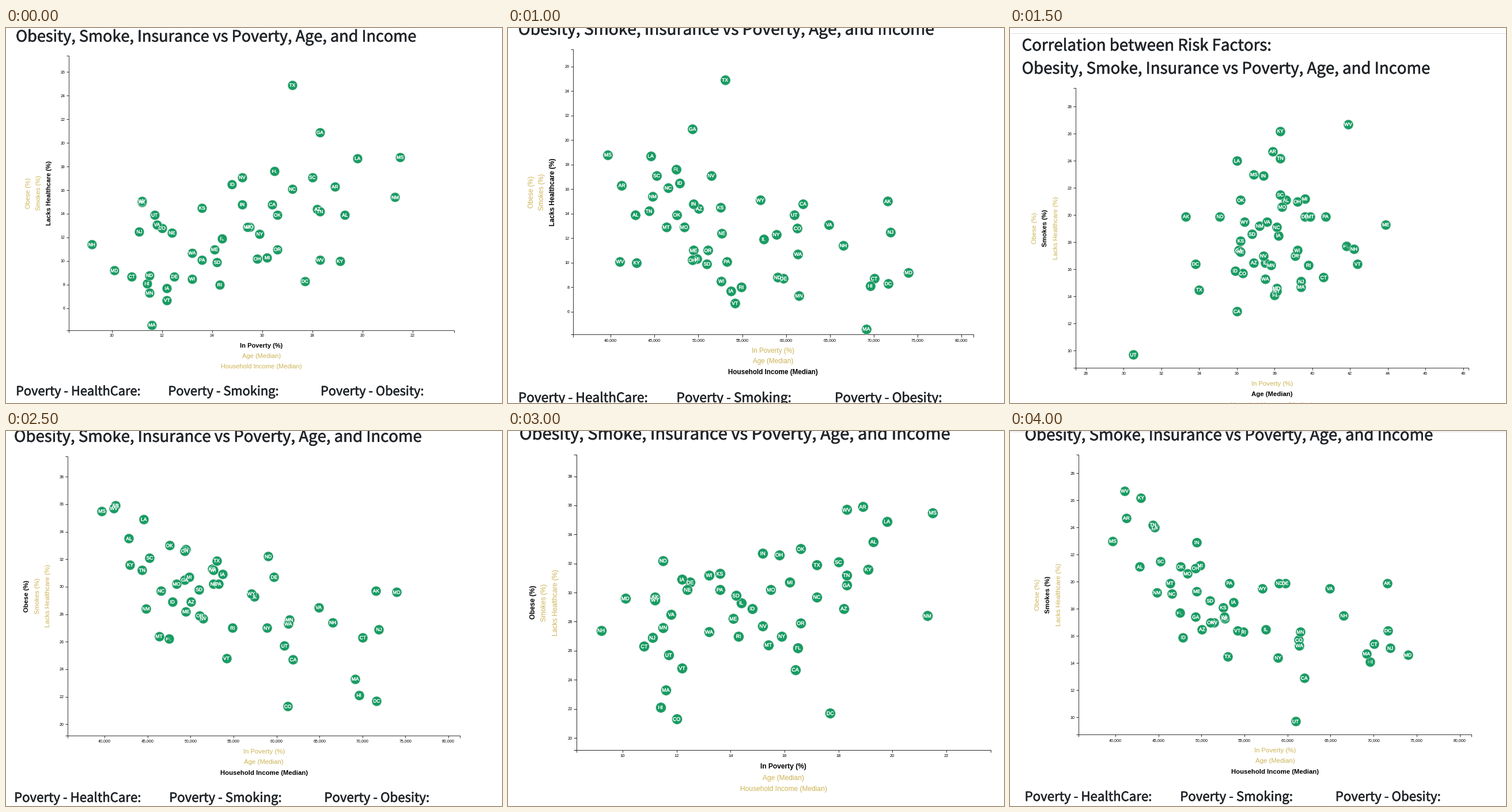
These frames come from a looping animation (861x650 px, 4.5 s). A matplotlib script:

```python
import numpy as np
import matplotlib.pyplot as plt
from matplotlib.animation import FuncAnimation
from matplotlib.patheffects import withStroke

W, H, DPI = 861, 650, 64
PT = 72 / DPI                 # points per pixel
CHART_W, CHART_H = 960, 683   # chart size in its own units

INK = "#212529"
GREEN = "#179c62"
GOLD = "#cdb354"

STATES = ("AL AK AZ AR CA CO CT DE DC FL GA HI ID IL IN IA KS KY LA ME MD MA MI MN MS "
          "MO MT NE NV NH NJ NM NY NC ND OH OK OR PA RI SC SD TN TX UT VT VA WA WV WI WY").split()

DATA = {
    "poverty": [19.3, 11.2, 18.2, 18.9, 16.4, 12, 10.8, 12.5, 17.7, 16.5, 18.3, 11.4, 14.8,
                14.4, 15.2, 12.2, 13.6, 19.1, 19.8, 14.1, 10.1, 11.6, 16.2, 11.5, 21.5, 15.5,
                15.4, 12.4, 15.2, 9.2, 11.1, 21.3, 15.9, 17.2, 11.5, 15.8, 16.6, 16.6, 13.6,
                14.3, 18, 14.2, 18.3, 17.2, 11.7, 12.2, 11.8, 13.2, 18.3, 13.2, 11.2],
    "age": [38.6, 33.3, 36.9, 37.9, 36, 36.3, 40.6, 39.6, 33.8, 41.8, 36.1, 38, 35.9,
            37.5, 37.4, 38.2, 36.2, 38.3, 36, 43.9, 38.1, 39.4, 39.6, 37.8, 36.9, 38.4,
            39.9, 36.2, 37.4, 42.2, 39.4, 37.2, 38.1, 38.1, 35.1, 39.2, 36.2, 39.1, 40.7,
            39.8, 38.3, 36.8, 38.3, 34, 30.5, 42.4, 37.6, 37.5, 41.9, 39.2, 36.4],
    "income": [42830, 71583, 50068, 41262, 61933, 61303, 70048, 59716, 71648, 47463, 49321,
               69592, 47861, 57444, 49446, 53712, 52504, 42958, 44555, 49462, 73971, 69160,
               49847, 61481, 39680, 48363, 46328, 52686, 51450, 66532, 71919, 44803, 58878,
               46556, 59029, 49308, 47529, 51075, 53234, 54891, 45238, 50979, 44361, 53035,
               60922, 54166, 64902, 61366, 41059, 52622, 57055],
    "care": [13.9, 15, 14.4, 16.3, 14.8, 12.8, 8.7, 8.7, 8.3, 17.6, 20.9, 8.1, 16.5,
             11.9, 14.8, 7.7, 14.5, 10, 18.7, 11, 9.2, 4.6, 10.3, 7.3, 18.8, 12.9,
             12.9, 12.4, 17.1, 11.4, 12.5, 15.4, 12.3, 16.1, 8.8, 10.2, 13.9, 11, 10.1,
             8, 17.1, 9.9, 14.2, 24.9, 13.9, 6.7, 13.1, 10.7, 10.1, 8.5, 15.1],
    "smokes": [21.1, 19.9, 16.5, 24.7, 12.9, 15.7, 15.4, 19.9, 16.4, 17.7, 17.4, 14.1, 15.9,
               16.5, 22.9, 18.5, 18.1, 26.2, 24, 19.3, 14.6, 14.7, 21.2, 16.3, 23, 20.6,
               19.9, 17.3, 17, 17.5, 15.1, 19.2, 14.4, 19.1, 19.9, 21, 21.1, 17, 19.9,
               16.3, 21.5, 18.6, 24.2, 14.5, 9.7, 16.4, 19.5, 15.3, 26.7, 17.4, 19.5],
    "obese": [33.5, 29.7, 28.9, 35.9, 24.7, 21.3, 26.3, 30.7, 21.7, 26.2, 30.5, 22.1, 28.9,
              29.3, 32.7, 30.9, 31.3, 31.6, 34.9, 28.2, 29.6, 23.3, 30.7, 27.6, 35.5, 30.2,
              26.4, 30.2, 27.7, 27.4, 26.9, 28.4, 27, 29.7, 32.2, 32.6, 33, 27.9, 30.2,
              27, 32.1, 29.8, 31.2, 31.9, 25.7, 24.8, 28.5, 27.3, 35.7, 31.2, 29.5],
}

X_LABELS = {"poverty": "In Poverty (%)", "age": "Age (Median)",
            "income": "Household Income (Median)"}
Y_LABELS = {"care": "Lacks Healthcare (%)", "smokes": "Smokes (%)", "obese": "Obese (%)"}

# x variable, y variable, chart left, chart top, chart width, y of the page edge line
VIEWS = [
    ("poverty", "care", 108.7, 48, 669, None),
    ("age", "care", 112, 42, 682, 0),
    ("income", "care", 113, 37, 694.8, None),
    ("age", "smokes", 114, 104, 682, 8),
    ("poverty", "smokes", 114, 95.7, 682, None),
    ("income", "obese", 107.3, 43.6, 681, None),
    ("poverty", "obese", 118.5, 41, 719.5, None),
    ("age", "obese", 114, 41, 682, 0),
    ("income", "smokes", 119, 41, 682, 0),
]

fig = plt.figure(figsize=(W / DPI, H / DPI), dpi=DPI, facecolor="white")
ax = fig.add_axes([0, 0, 1, 1])


def write(x, y, text, px, color="black", font="Liberation Sans", ha="center",
          bold=False, turn=0, thicken=0.0):
    t = ax.text(x, y, text, fontsize=px * PT, color=color, family=font, ha=ha,
                va="baseline", weight="bold" if bold else "normal",
                rotation=turn, rotation_mode="anchor")
    if thicken:
        t.set_path_effects([withStroke(linewidth=thicken * PT, foreground=color)])


def heading(x, y, text, px):
    write(x, y, text, px, INK, "Noto Sans CJK JP", "left", thicken=0.6)


def line(xs, ys, width, color="black"):
    ax.plot(xs, ys, color=color, lw=width * PT, solid_capstyle="butt",
            solid_joinstyle="miter")


def domain(key):
    return min(DATA[key]) * 0.9, max(DATA[key]) * 1.1


def ticks(key):
    lo, hi = domain(key)
    step = 5000 if key == "income" else 2
    return np.arange(np.ceil(lo / step), np.floor(hi / step) + 1) * step


def draw_axes(xkey, ykey, left, top, s, to_x, to_y):
    right, bottom = left + CHART_W * s, top + CHART_H * s
    tick, pen = 6 * s, 1.1 * s
    line([left, left, right, right], [bottom + tick, bottom, bottom, bottom + tick], pen)
    line([left - tick, left, left, left - tick], [top, top, bottom, bottom], pen)
    for v in ticks(xkey):
        line([to_x(v)] * 2, [bottom, bottom + tick], pen)
        write(to_x(v), bottom + 16.1 * s, f"{v:,.0f}", 10 * s)
    for v in ticks(ykey):
        line([left - tick, left], [to_y(v)] * 2, pen)
        write(left - 9 * s, to_y(v) + 3.4 * s, f"{v:.0f}", 10 * s, ha="right")


def draw_labels(xkey, ykey, left, top, s):
    mid_x, mid_y = left + CHART_W * s / 2, top + CHART_H * s / 2
    for i, (key, text) in enumerate(X_LABELS.items()):
        on = key == xkey
        write(mid_x, top + (CHART_H + 43.3 + 26 * i) * s, text, 16 * s,
              "black" if on else GOLD, bold=on)
    for i, (key, text) in enumerate(Y_LABELS.items()):
        on = key == ykey
        write(left - (43.8 + 26 * i) * s, mid_y, text, 16 * s,
              "black" if on else GOLD, bold=on, turn=90)


def draw_page(left, top, s):
    x = left - 131.5 * s
    heading(x, top - 91.3 * s, "Correlation between Risk Factors:", 38.85 * s)
    heading(x, top - 35 * s, "Obesity, Smoke, Insurance vs Poverty, Age, and Income", 38.85 * s)
    for i, name in enumerate(("HealthCare", "Smoking", "Obesity")):
        heading(x + 379.5 * i * s, top + (CHART_H + 161.8) * s, f"Poverty - {name}:", 31.3 * s)


def draw(n):
    xkey, ykey, left, top, width, edge = VIEWS[n % len(VIEWS)]
    s = width / CHART_W
    (x0, x1), (y0, y1) = domain(xkey), domain(ykey)

    def to_x(v):
        return left + (v - x0) / (x1 - x0) * width

    def to_y(v):
        return top + (y1 - v) / (y1 - y0) * CHART_H * s

    ax.clear()
    ax.set(xlim=(0, W), ylim=(H, 0))
    ax.axis("off")

    if edge is not None:
        line([0, W], [edge + 0.5] * 2, 1, "#dcdfe3")
    draw_page(left, top, s)
    draw_axes(xkey, ykey, left, top, s, to_x, to_y)
    draw_labels(xkey, ykey, left, top, s)

    cx, cy = to_x(np.array(DATA[xkey])), to_y(np.array(DATA[ykey]))
    ax.scatter(cx, cy, s=(24 * s * PT) ** 2, c=GREEN, edgecolors="#e3e3e3",
               linewidths=s * PT, zorder=3)
    for name, x, y in zip(STATES, cx, cy):
        write(x, y + 4.2 * s, name, 11.8 * s, "white", thicken=0.25)
    return []


anim = FuncAnimation(fig, draw, frames=len(VIEWS), init_func=lambda: draw(0),
                     interval=500, repeat=True, repeat_delay=0, blit=False)
plt.show()
```
